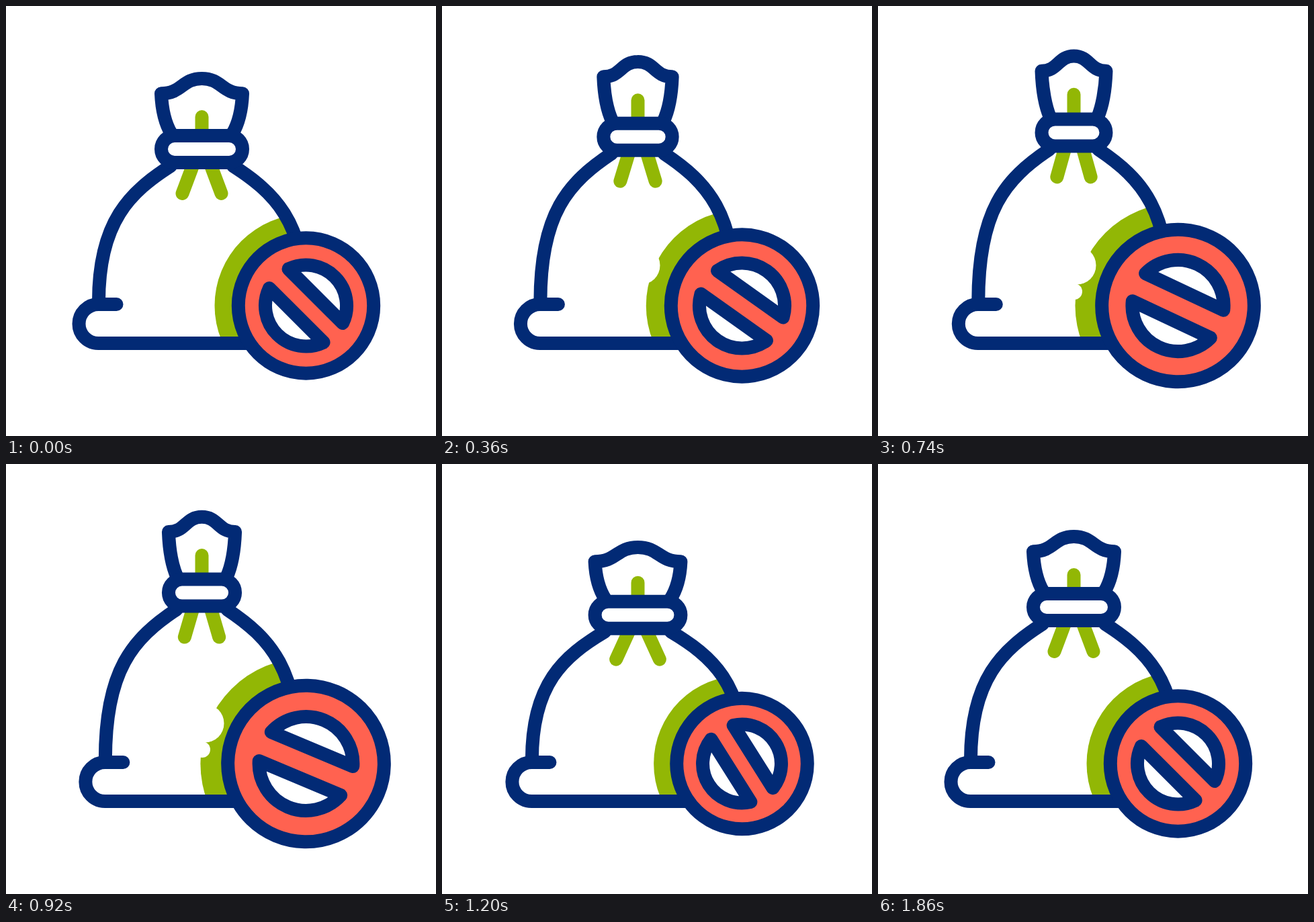
These frames come from a looping animation (640 by 640 pixels, 1900 ms). An HTML page:

```html
<!DOCTYPE html>
<html lang="en">
<head>
<meta charset="utf-8">
<title>Money bag</title>
<style>
  html, body { margin: 0; width: 100%; height: 100%; overflow: hidden; background: #fff; }
  svg { display: block; width: 100vw; height: 100vh; }
  .line { fill: none; stroke: #022a75; stroke-width: 20; stroke-linecap: round; stroke-linejoin: round; }
  .tie { fill: none; stroke: #92b705; stroke-width: 20; stroke-linecap: round; }
  .white { fill: #fff; }
  .red { fill: #ff6250; }
</style>
</head>
<body>
<svg viewBox="0 0 640 640">
  <clipPath id="bodyClip"><path id="inside"/></clipPath>
  <g clip-path="url(#bodyClip)">
    <circle id="shade" cx="446.5" cy="446" fill="#92b705"/>
    <g id="bites" class="white">
      <circle cx="296" cy="386" r="28.5"/>
      <circle cx="292" cy="425" r="12"/>
    </g>
  </g>
  <path id="ties" class="tie"/>
  <path id="body" class="line"/>
  <path id="cuff" class="line"/>
  <path id="neck" class="line"/>
  <rect id="collar" class="line white" height="40" rx="20"/>
  <g id="badge">
    <circle id="disc" class="line red"/>
    <path id="upper" class="line white"/>
    <path id="lower" class="line white"/>
  </g>
</svg>
<script>
const LOOP = 1900, STEP = 20, MID = 291.5, BASE = 502;
const el = id => document.getElementById(id);
const set = (id, attrs) => {
  for (const key in attrs) el(id).setAttribute(key, attrs[key]);
};
const mix = (a, b, p) => a + (b - a) * p;
const clamp = x => Math.max(0, Math.min(1, x));
const span = (t, from, to) => clamp((t - from) / (to - from));
const wave = p => (1 - Math.cos(Math.PI * p)) / 2;

// 1 is fully stretched, -1 fully squashed
function stretchAt(t) {
  const rise = x => x < 110 ? 0 : 1 - Math.exp((110 - x) / 200);
  if (t < 880) return rise(t);
  if (t < 1110) return mix(rise(880), -1, wave(span(t, 880, 1110)));
  return -1 + wave(span(t, 1110, 1280));
}

// Slow rise to peak, swing to the opposite side, damped return
function swingAt(t, peak, dip, bend) {
  if (t < 900) {
    const p = span(t, 110, 900);
    return peak * p * (1 + bend - bend * p);
  }
  if (t < 1240) return mix(peak, dip, wave(span(t, 900, 1240)));
  const x = (t - 1240) / 58;
  return dip * (1 + x) * Math.exp(-x);
}

function drawBag(q) {
  const pick = (up, down) => q * (q > 0 ? up : down);
  const y = v => BASE - (BASE - v) * (1 + 0.0888 * q);
  const shift = pick(11.8, 9);
  const squeeze = pick(13.1, 7.5);
  const collarY = y(213);
  const half = 60.5 - squeeze;
  const side = 153.5 - shift;
  const hip = 106.5 - pick(4, 9);
  const shoulder = 46.5 - squeeze * 0.8;

  const curve = dir => {
    const x = v => MID + dir * v;
    return `M${x(shoulder)} ${collarY + 25}C${x(hip)} ${y(277)} ` +
      `${x(side)} ${y(320)} ${x(side)} 440`;
  };
  set('body', { d: curve(-1) + curve(1) });
  set('inside', {
    d: `${curve(-1)}V${BASE}H${MID + side}V440` +
      `C${MID + side} ${y(320)} ${MID + hip} ${y(277)} ${MID + shoulder} ${collarY + 25}Z`
  });
  set('cuff', { d: `M${164.5 + shift} 444H${137.5 + shift}a29 29 0 0 0 0 58H380` });
  set('collar', { x: MID - half, y: collarY - 20, width: half * 2 });

  const horn = y(130.3) - pick(2, 0), crown = y(108), foot = collarY - 23;
  const neckSide = dir => {
    const x = v => MID + dir * v;
    return `M${x(shoulder - 1)} ${foot}C${x(half - 6)} ${foot - 15} ${x(half - 1)} ${mix(horn, foot, 0.4)} ` +
      `${x(half)} ${horn}C${x(half * 0.49)} ${horn} ${x(half * 0.49)} ${crown} ${MID} ${crown}`;
  };
  set('neck', { d: neckSide(-1) + neckSide(1) });

  const spread = 29 - pick(4, 7.3);
  const leg = dir => `M${MID + dir * 14} ${collarY + 26}L${MID + dir * spread} ${collarY + 66}`;
  set('ties', { d: `M${MID} ${collarY}V${collarY - 48 - pick(9, 0)}` + leg(-1) + leg(1) });
}

function drawBadge(grow, angle) {
  const scale = 1 + grow / 100.7;
  const r = 60.5 * scale, gap = 20.2 * scale;
  const w = Math.sqrt(r * r - gap * gap);
  set('shade', { r: 136 * scale });
  set('disc', { r: 100.7 * scale });
  set('upper', { d: `M${-w} ${-gap}A${r} ${r} 0 0 1 ${w} ${-gap}Z` });
  set('lower', { d: `M${-w} ${gap}A${r} ${r} 0 0 0 ${w} ${gap}Z` });
  set('badge', { transform: `translate(446.5 446) rotate(${45 + angle})` });
}

function draw(now) {
  const t = Math.floor((now % LOOP) / STEP) * STEP;
  const q = stretchAt(t);
  drawBag(q);
  drawBadge(swingAt(t, 15.8, -4.1, 0), swingAt(t, -22.5, 14, 0.5));
  set('bites', { visibility: q > 0 ? 'visible' : 'hidden' });
}

let start;
function tick(now) {
  start ??= now;
  draw(now - start);
  requestAnimationFrame(tick);
}
draw(0);
requestAnimationFrame(tick);
</script>
</body>
</html>
```
